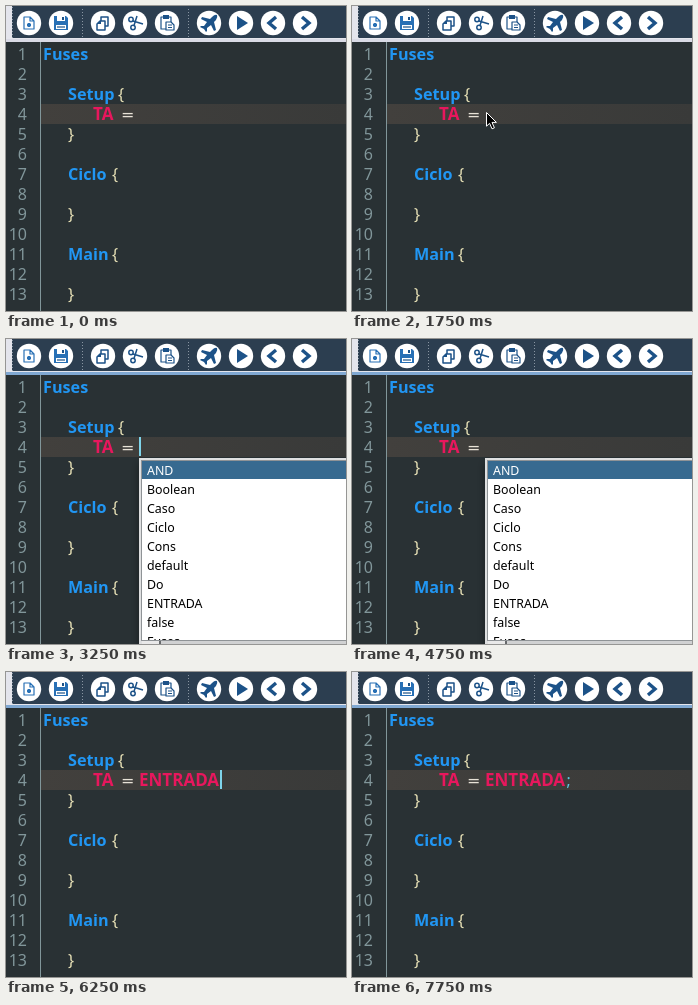
Animation of 340x305 px, one loop 8.25 s. Source, as an HTML page:

```html
<!DOCTYPE html>
<html lang="es">
<head>
<meta charset="utf-8">
<title>Code completion</title>
<style>
  html, body { margin: 0; width: 100%; height: 100%; overflow: hidden; background: #293134; }
  svg { display: block; width: 340px; height: 305px; }
  text { font: 16px "Noto Sans", sans-serif; white-space: pre; }
  .number { fill: #81969a; text-anchor: end; }
  .keyword { fill: #2196f3; font-size: 16.2px; font-weight: 700; }
  .constant { fill: #e8175d; font-size: 17px; font-weight: 700; }
  .brace { fill: #e8e2b7; }
  .operator { fill: #e8e2d7; font-family: "DejaVu Sans", sans-serif; }
  .typed { fill: #5cc8e0; }
  #items text { font-size: 12.4px; font-weight: 500; }
  .icon { fill: none; stroke: #1c5288; stroke-width: 1.5; stroke-linejoin: round; }
  .solid { fill: #1c5288; stroke: none; }
  .page { stroke-width: 1.2; }
</style>
</head>
<body>
<svg viewBox="0 0 340 305">
  <defs>
    <linearGradient id="fade">
      <stop stop-color="#42403d"/>
      <stop offset="1" stop-color="#393a39"/>
    </linearGradient>
    <filter id="shadow" x="-20%" y="-20%" width="140%" height="140%">
      <feDropShadow dx="0" dy="5" stdDeviation="4" flood-opacity=".4"/>
    </filter>
    <clipPath id="listClip"><rect x="136" y="122" width="204" height="179"/></clipPath>
  </defs>

  <rect width="340" height="305" fill="#293134"/>
  <rect width="340" height="33" fill="#2c3e50"/>
  <rect width="6" height="33" fill="#e4e5ec"/>
  <path d="M6.5 1V32M76.5 3V31M182.5 3V31" stroke="#8996a3" stroke-dasharray="1 2"/>
  <rect y="32" width="340" height="1" fill="#e4e5ec"/>
  <rect id="divider" y="33" width="340" height="3"/>
  <g id="toolbar"></g>

  <rect x="35" y="98" width="305" height="20" fill="url(#fade)"/>
  <rect x="34" y="36" width="1" height="269" fill="#81969a"/>
  <g id="code"></g>
  <text id="value" x="133" y="114"></text>
  <text id="semicolon" class="typed" x="214.5" y="114">;</text>

  <g id="popup">
    <rect x="133" y="119" width="230" height="210" fill="#dedfe0" filter="url(#shadow)"/>
    <rect x="135" y="121" width="205" height="181" fill="#8f9396"/>
    <rect x="136" y="122" width="204" height="179" fill="#fff"/>
    <rect x="136" y="122" width="204" height="18" fill="#376a90"/>
    <g id="items" clip-path="url(#listClip)"></g>
    <rect x="136" y="302" width="17" height="3" fill="#e9e9e9"/>
    <rect x="153" y="302" width="2" height="3" fill="#66696b"/>
    <rect x="155" y="302" width="185" height="3" fill="#d0d1d2"/>
  </g>

  <rect id="caret" y="98" width="2" height="19" fill="#7fd4ea"/>
  <path id="pointer" d="M.5 .5V14.2L3.6 11.3 6 16.8 8.4 15.8 6 10.4H10.4Z" fill="#000" stroke="#fff"/>
</svg>

<script>
const LOOP = 8250;
const $ = id => document.getElementById(id);

// Icons are drawn around the centre of their white disc.
const newPage = '<g style="stroke:#2870b5"><path class="page" d="M-5-6H1L5-2V6H-5ZM1-6V-2H5"/><path d="M-2 2H2M0 0V4" style="stroke-width:2.4"/></g>';
const floppy = '<path d="M-7-7H5L7-5V7H-7Z" style="fill:#2870b5;stroke:none"/><path d="M-4-7H4V-2H-4ZM-5 2H5V6H-5Z" style="fill:#fff;stroke:none"/><path class="solid" d="M1-6H3V-3H1Z"/><path class="page" d="M-4 4H4"/>';
const copy = '<path d="M-2-6H5V3H-2L-2-3Z"/><path d="M-3-2H2V7H-6V1Z" style="fill:#fff"/><path class="solid" d="M-6 1H-2V-3Z"/>';
const scissors = '<circle cx="-4" cy="-3.5" r="2.2"/><circle cx="-2" cy="4.5" r="2.2"/><path d="M-2-2L8 1M-1 2.5L2-7"/>';
const paste = '<path class="page" d="M-6-6H4V6H-6Z"/><path class="solid" d="M-4-8H2V-4H-4Z"/><path class="page" d="M-1-1H4L7 2V7H-1Z" style="fill:#fff"/><path class="page" d="M1 2H5M1 4.5H5"/>';
const plane = '<path class="solid" d="M8-8Q6-9 3-6L1-4-7-6-8-4-2-1-5 3-8 3-9 4-5 6-3 9-2 8-2 5 2 2 5 8 7 7 5-1 7-3Q9-6 8-8Z"/>';
const play = '<path class="solid" d="M-4-7L7 0-4 7Z"/>';
const chevron = side => `<path d="M${-3 * side}-6L${4 * side} 0 ${-3 * side} 6" style="stroke-width:3.4;stroke-linejoin:miter"/>`;

const icons = [[23, newPage], [55, floppy], [97, copy], [129, scissors], [161, paste],
  [203, plane], [235, play], [267, chevron(-1)], [299, chevron(1)]];
$('toolbar').innerHTML = icons.map(([x, shape]) =>
  `<g class="icon" transform="translate(${x} 17)"><circle r="12.2" style="fill:#fff;stroke:none"/>${shape}</g>`).join('');

const label = (x, y, text, kind = '') => `<text class="${kind}" x="${x}" y="${y}">${text}</text>`;
const baseline = line => 34 + 20 * line;
const tokens = [
  [1, 37, 'Fuses', 'keyword'],
  [3, 62, 'Setup', 'keyword'], [3, 112, '{', 'brace'],
  [4, 87, 'TA', 'constant'], [4, 115, '=', 'operator'], [5, 62, '}', 'brace'],
  [7, 62, 'Ciclo', 'keyword'], [7, 106, '{', 'brace'], [9, 62, '}', 'brace'],
  [11, 62, 'Main', 'keyword'], [11, 106, '{', 'brace'], [13, 62, '}', 'brace']
];
$('code').innerHTML =
  Array.from({ length: 13 }, (_, i) => label(21, baseline(i + 1), i + 1, 'number')).join('') +
  tokens.map(([line, x, text, kind]) => label(x, baseline(line), text, kind)).join('');

const words = ['AND', 'Boolean', 'Caso', 'Ciclo', 'Cons', 'default', 'Do', 'ENTRADA', 'false', 'Fuses'];
const listItems = names => names.map((name, i) =>
  label(141, 136 + 19 * i, name).replace('<text', `<text fill="${i ? '#000' : '#fff'}"`)).join('');
const fullList = listItems(words);
const filteredList = listItems(['ENTRADA']);

// Each track lists [start time, value]; a value holds until the next entry.
const pointerTrack = [[0, null], [500, [291, 113]], [750, [256, 169]], [1250, [126, 105]],
  [1500, [124, 105]], [1750, [134, 106]], [2500, null]];
const caretTrack = [[0, null], [2250, 133], [2750, null], [3250, 133], [3750, null], [4250, 133],
  [4750, null], [5000, 142], [5500, 154], [6000, null], [6250, 214], [6750, null], [7250, 219], [7750, null]];
const valueTrack = [[0, ''], [5000, 'E'], [5500, 'EN'], [6250, 'ENTRADA']];
const listTrack = [[0, ''], [3250, fullList], [5000, filteredList], [6250, '']];
const at = (track, time) => track.findLast(([start]) => start <= time)[1];
const show = (id, visible) => $(id).setAttribute('visibility', visible ? 'visible' : 'hidden');

function draw(now) {
  const time = now % LOOP;
  const pointer = at(pointerTrack, time);
  const caret = at(caretTrack, time);
  const value = at(valueTrack, time);
  const list = at(listTrack, time);

  $('divider').setAttribute('fill', time < 2250 ? '#d9dae5' : '#80a8d2');
  show('pointer', pointer);
  if (pointer) $('pointer').setAttribute('transform', `translate(${pointer})`);
  show('caret', caret);
  if (caret) $('caret').setAttribute('x', caret);
  $('value').textContent = value;
  $('value').setAttribute('class', value === 'ENTRADA' ? 'constant' : 'typed');
  show('semicolon', time >= 7250);
  show('popup', list);
  $('items').innerHTML = list;
}

const start = performance.now();
function tick() {
  draw(performance.now() - start);
  requestAnimationFrame(tick);
}
tick();
</script>
</body>
</html>
```
